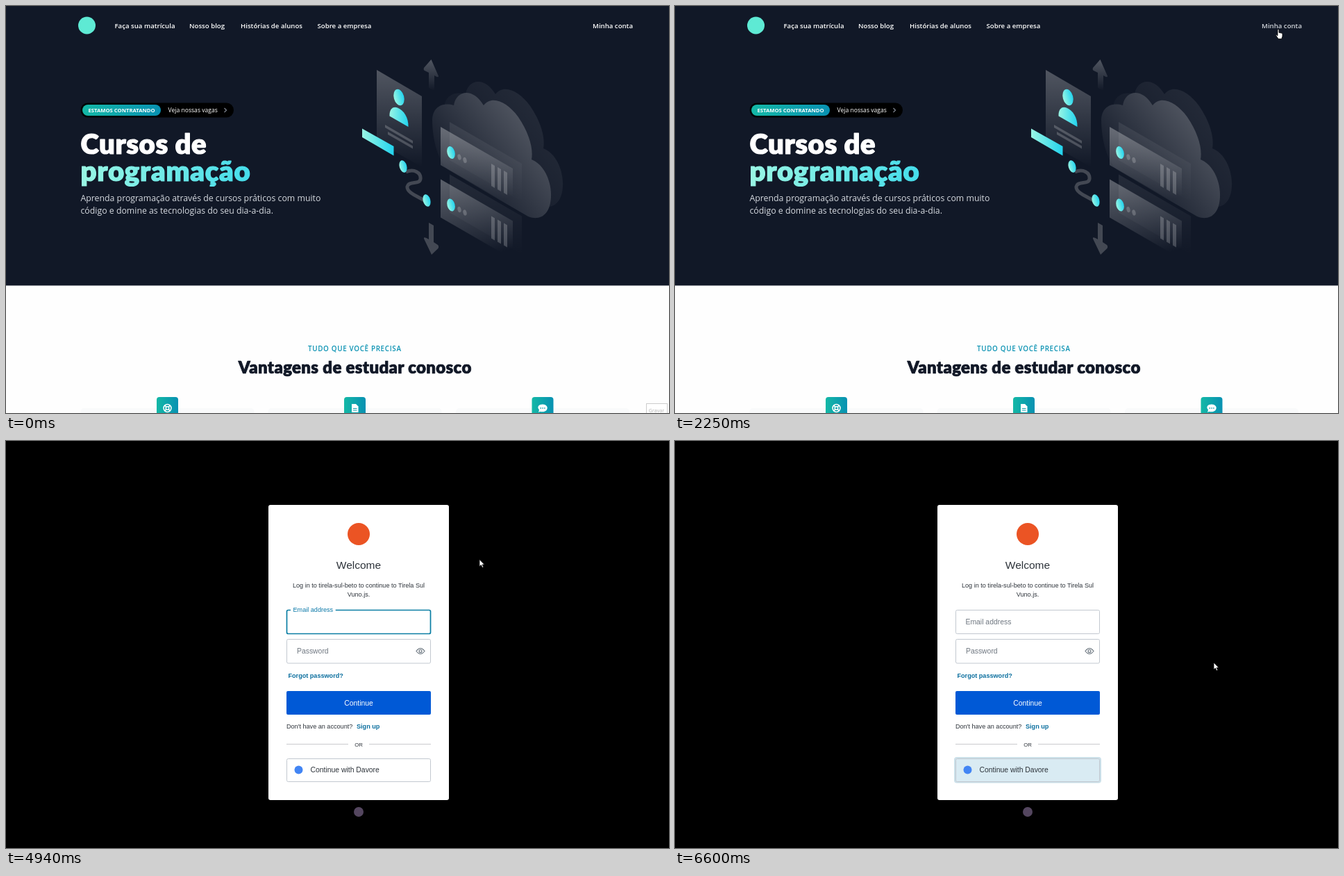
Animation of 955 by 586 pixels, one loop 8000 ms. Source, as an HTML page:

```html
<!DOCTYPE html>
<html lang="pt-BR">
<head>
<meta charset="utf-8">
<title>Cursos</title>
<style>
  html, body { margin: 0; width: 100%; height: 100%; overflow: hidden; background: #000; }
  svg { display: block; width: 100vw; height: 100vh; }
  #home { font-family: "Open Sans", "Noto Sans", sans-serif; }
  #login { font: 9.1px "Liberation Sans", Arial, sans-serif; fill: #2d333a; }
  .nav { font-size: 9.65px; font-weight: 600; fill: #fff; }
  .title { font-family: Lato, sans-serif; font-weight: 900; font-size: 40px; letter-spacing: .014em; stroke-width: .03em; stroke-linejoin: round; }
  .lead { font-size: 12.3px; fill: #d6dae0; }
  .field { font-size: 10.4px; }
  .link { font-weight: 700; fill: #0a6e9e; }
  .mid { text-anchor: middle; }
  .box { fill: none; stroke: #c2c8d0; }
</style>
</head>
<body>
<svg viewBox="0 0 955 586">
  <defs>
    <linearGradient id="teal"><stop stop-color="#14b8a6"/><stop offset="1" stop-color="#0891b2"/></linearGradient>
    <linearGradient id="aqua"><stop stop-color="#99f6e4"/><stop offset="1" stop-color="#22d3ee"/></linearGradient>
    <linearGradient id="word" gradientUnits="userSpaceOnUse" x1="108" x2="454" y1="0" y2="0"><stop stop-color="#99f6e4"/><stop offset="1" stop-color="#22d3ee"/></linearGradient>
    <linearGradient id="fade" x2="0" y2="1"><stop stop-color="#fff" stop-opacity=".27"/><stop offset="1" stop-color="#fff" stop-opacity="0"/></linearGradient>
    <linearGradient id="panel" x1=".25" y1="0" x2=".5" y2="1"><stop stop-color="#fff" stop-opacity=".3"/><stop offset="1" stop-color="#fff" stop-opacity="0"/></linearGradient>
    <linearGradient id="mist" x1=".2" y1=".8" x2=".85" y2=".25"><stop stop-color="#fff" stop-opacity="0"/><stop offset="1" stop-color="#fff" stop-opacity=".27"/></linearGradient>
    <path id="cloud" d="M614 165C614 146 628 138 645 143C648 122 672 116 688 143C700 128 722 138 738 160C753 182 760 205 757 221C775 228 786 252 785 275C784 300 770 310 752 303L640 238C622 228 614 190 614 165Z"/>
    <path id="arrowUp" d="M612.500 77L623 101Q623 104 617 100V122L609 118V96L603 93Q601 92 602 89Z"/>
    <g id="server">
      <path d="M639 167L743 227V282L639 222Z" fill="url(#fade)" opacity=".3"/>
      <path d="M626 174L730 234V289L626 229Z" fill="url(#panel)"/>
      <ellipse cx="641" cy="211" rx="5.500" ry="9.300" transform="rotate(-15 641 211)" fill="url(#aqua)"/>
      <g fill="#fff" fill-opacity=".2">
        <ellipse cx="653" cy="217.500" rx="2.500" ry="4.200" transform="rotate(-15 653 217.500)"/>
        <ellipse cx="661" cy="222" rx="2.500" ry="4.200" transform="rotate(-15 661 222)"/>
        <path d="M699 227l5 3v32l-5-3zM708 232l5 3v32l-5-3zM717 237l5 3v32l-5-3z"/>
      </g>
    </g>
    <g id="tile">
      <rect x="-125" y="16" width="250" height="30" rx="5" fill="#f9fafb"/>
      <rect x="-15.500" width="31" height="31" rx="4" fill="url(#teal)"/>
    </g>
  </defs>

  <g id="home">
    <rect width="955" height="586" fill="#fefefe"/>
    <rect width="955" height="402.500" fill="#111827"/>
    <circle cx="116.500" cy="28" r="12.500" fill="#5eead4"/>
    <g class="nav">
      <text x="156.500" y="32">Faça sua matrícula</text>
      <text x="264" y="32">Nosso blog</text>
      <text x="338" y="32">Histórias de alunos</text>
      <text x="448.500" y="32">Sobre a empresa</text>
      <text id="account" x="903" y="32" text-anchor="end">Minha conta</text>
    </g>

    <rect x="107.500" y="139.500" width="220.500" height="21" rx="10.500"/>
    <rect x="110" y="142" width="113" height="16" rx="8" fill="url(#teal)"/>
    <text class="mid" x="166.500" y="153.200" font-size="7.700" font-weight="700" fill="#fff">ESTAMOS CONTRATANDO</text>
    <text x="233.500" y="153.300" font-size="8.600" fill="#fff">Veja nossas vagas</text>
    <path d="M314.500 147l3 3-3 3" fill="none" stroke="#7b818c" stroke-width="1.300"/>

    <text class="title" x="107.500" y="212.500" fill="#fff" stroke="#fff">Cursos de</text>
    <text class="title" x="107.500" y="251.500" fill="url(#word)" stroke="url(#word)" style="letter-spacing:.02em">programação</text>
    <text class="lead" x="107.500" y="281">Aprenda programação através de cursos práticos com muito</text>
    <text class="lead" x="107.500" y="299">código e domine as tecnologias do seu dia-a-dia.</text>

    <use href="#cloud" x="17" y="-16" fill="url(#mist)" opacity=".3"/>
    <use href="#cloud" fill="#111827"/>
    <use href="#cloud" fill="url(#mist)"/>
    <path d="M534 92L599 130V232L534 195Z" fill="url(#fade)"/>
    <ellipse cx="566" cy="131.500" rx="7.300" ry="12" transform="rotate(-15 566 131.500)" fill="url(#aqua)"/>
    <path d="M552.500 158.500C552 149 557 144 564 146.500C573 150 580 161 579.500 174Z" fill="url(#aqua)"/>
    <path d="M546 171l40 23v4l-40-23zM550 181l36 20.500v4l-36-20.500z" fill="#fff" fill-opacity=".2"/>
    <path d="M513 176.500L558.500 202V215.500L513 189Z" fill="url(#aqua)"/>
    <use href="#arrowUp" fill="url(#fade)"/>
    <path d="M609 312L616 316V340L622 344Q624 346 622.500 349L613 358L602 335Q601 331 609 336Z" fill="#434853"/>
    <path d="M576 239C588 234 598 240 597 249C596 258 580 251 578 260C577 268 590 273 603 280" fill="none" stroke="#434853" stroke-width="5"/>
    <ellipse cx="572" cy="231" rx="5.300" ry="9" transform="rotate(-15 572 231)" fill="url(#aqua)"/>
    <ellipse cx="606" cy="280" rx="5.300" ry="9" transform="rotate(-15 606 280)" fill="url(#aqua)"/>
    <use href="#server"/>
    <use href="#server" y="75.500"/>

    <text x="435" y="497" font-size="9.900" font-weight="600" letter-spacing=".65" fill="#0891b2">TUDO QUE VOCÊ PRECISA</text>
    <text class="title mid" x="502.700" y="529" style="font-size:24px" fill="#111827" stroke="#111827">Vantagens de estudar conosco</text>
    <use href="#tile" x="232.500" y="563"/>
    <use href="#tile" x="502.500" y="563"/>
    <use href="#tile" x="773" y="563"/>
    <g fill="none" stroke="#fff" stroke-width="1.500">
      <circle cx="232.500" cy="579" r="5.500"/><circle cx="232.500" cy="579" r="2.300"/>
      <path d="M228.600 575.100l2.300 2.300m3.200 3.200l2.300 2.300m0-7.800l-2.300 2.300m-3.200 3.200l-2.300 2.300"/>
    </g>
    <path d="M498 573h6l3.500 3.500V585H498z" fill="#fff"/>
    <path d="M500 579.500h5.500M500 582h5.500" stroke="#119fac"/>
    <path d="M767 585l1-3.500C764 577 768 573.500 773 573.500C783 574 781 584.500 773 584.300Q770.500 584.300 769 584Z" fill="#fff"/>
    <path d="M769.500 579h1.500m1.300 0h1.500m1.300 0h1.500" stroke="#119fac" stroke-width="1.500"/>
    <g id="tooltip">
      <rect x="922.500" y="572.500" width="30" height="18" fill="#fff" stroke="#ccc"/>
      <text class="mid" x="937" y="584.500" font-size="7.200" fill="#b5b5b5">Gravar</text>
    </g>
  </g>

  <g id="login">
    <rect width="955" height="586" fill="#000"/>
    <rect x="378" y="92" width="260" height="425" rx="3" fill="#fff"/>
    <circle cx="508" cy="134" r="16" fill="#eb5424"/>
    <circle cx="508" cy="534" r="7" fill="#54465f"/>
    <text class="mid" x="508" y="184" font-size="15.500">Welcome</text>
    <text class="mid" x="508" y="210.500">Log in to tirela-sul-beto to continue to Tirela Sul</text>
    <text class="mid" x="508" y="224">Vuno.js.</text>

    <rect class="box" x="404.500" y="243.500" width="207" height="34" rx="2"/>
    <rect id="emailRing" class="box" x="404.500" y="243.500" width="207" height="34" rx="2" style="stroke:#0a7ea4"/>
    <rect id="emailGap" y="240" height="6" fill="#fff"/>
    <text id="emailLabel">Email address</text>
    <path id="caret" d="M415.500 255v11" stroke="#222"/>

    <rect class="box" x="404.500" y="285.500" width="207" height="34.500" rx="2"/>
    <rect id="passwordRing" class="box" x="404.500" y="285.500" width="207" height="34.500" rx="2" style="stroke:#222"/>
    <text id="passwordLabel" class="field" fill="#6f7780">Password</text>
    <g fill="none" stroke="#65707a" stroke-width="1.100">
      <path d="M591 302.500Q597 294.500 603 302.500Q597 310.500 591 302.500Z"/><circle cx="597" cy="302.500" r="2"/>
    </g>
    <text class="link" x="406.500" y="340.500">Forgot password?</text>

    <rect x="404" y="360" width="208" height="34" rx="2" fill="#0059d6"/>
    <text class="field mid" x="508" y="380.500" fill="#fff">Continue</text>
    <text x="404" y="414">Don't have an account?</text>
    <text class="link" x="505" y="414">Sign up</text>
    <path d="M404 436.500h89m30 0h89" stroke="#c9cace"/>
    <text class="mid" x="508" y="440" font-size="7.800">OR</text>

    <rect id="hover" x="404" y="457" width="208" height="34" rx="2" fill="#efefef"/>
    <g id="focus">
      <rect x="402" y="455" width="212" height="37.500" rx="4" fill="#cbe0e9"/>
      <rect x="404" y="457" width="208" height="34" rx="2" fill="#d9ebf3"/>
    </g>
    <rect class="box" x="404.500" y="457.500" width="207" height="33" rx="2"/>
    <circle cx="421.500" cy="473.500" r="6" fill="#4285f4"/>
    <text class="field" x="438.500" y="477">Continue with Davore</text>
  </g>

  <g id="cursor" fill="#fff" stroke="#000" stroke-width=".8" stroke-linejoin="round">
    <path id="arrow" d="M0 0V10.200l2.400-2.200 1.600 3.800 1.800-.7-1.600-3.700H7.400Z"/>
    <path id="hand" d="M-1 8V1.300a1 1 0 0 1 2 0V5l4 .8q1 .3 1 1.300v3.200L4.800 14H0L-3.500 8.900q.6-1.400 2.500.6Z"/>
  </g>
</svg>
<script>
const LOOP = 8000, LOGIN = 4180, BLUR = 5970;
const $ = id => document.getElementById(id);
const clamp = x => Math.min(1, Math.max(0, x));
const ease = x => x * x * (3 - 2 * x);
const mix = (a, b, u) => a + (b - a) * u;
const show = (id, on) => $(id).style.display = on ? "" : "none";
const set = (id, attrs) => Object.entries(attrs).forEach(([k, v]) => $(id).setAttribute(k, v));

// start, end, steps, control points of the path
const moves = [
  [70, 400, 6, [[953, 590], [760, 400], [647, 307]]],
  [1070, 1840, 12, [[648, 307], [595, 270], [690, 110], [833, 74]]],
  [1910, 2250, 6, [[833, 74], [869, 33.3]]],
  [2520, 2521, 1, [[869, 33.3], [869, 34]]],
  [2780, 3190, 7, [[869, 34], [830, 110], [773, 171]]],
  [4590, 5290, 11, [[773, 171], [740, 70], [650, 170], [614, 346]]],
  [5440, 5760, 6, [[614, 346], [580, 420], [529.5, 474.5]]],
  [6250, 6600, 6, [[529.5, 474.5], [640, 380], [776, 319]]],
];

function bezier(points, u) {
  while (points.length > 1)
    points = points.slice(1).map((p, i) => [mix(points[i][0], p[0], u), mix(points[i][1], p[1], u)]);
  return points[0];
}

function cursorAt(t) {
  const [start, end, steps, path] = moves.findLast(m => t >= m[0]) || moves[0];
  const step = Math.floor(clamp((t - start) / (end - start)) * (steps - 1) + 1e-6) + 1;
  return bezier(path, ease(step / steps));
}

function draw(t) {
  const login = t >= LOGIN;
  const [x, y] = cursorAt(t);
  const overLink = !login && x > 840 && y < 38;
  const inButtonX = login && x > 404 && x < 612;
  const overSocial = inButtonX && y > 457 && y < 491;
  const hand = overLink || overSocial || (inButtonX && y > 360 && y < 394);

  show("home", !login);
  show("login", login);
  show("tooltip", t < 70);
  show("cursor", t >= 70);
  show("arrow", !hand);
  show("hand", hand);
  set("cursor", { transform: `translate(${x} ${y})` });
  set("account", { fill: overLink ? "#d1d5db" : "#fff" });
  if (!login) return;

  const settle = ease(clamp((t - LOGIN) / 210));
  const blur = ease(clamp((t - BLUR) / 210));
  const labelX = mix(mix(415, 413.5, settle), 418.5, blur);
  const labelY = mix(mix(251, 246, settle), 264, blur);
  const labelSize = mix(mix(10.4, 9.1, settle), 10.4, blur);
  const pad = 3.5 * settle;
  set("emailLabel", { x: labelX, y: labelY, "font-size": labelSize });
  $("emailLabel").style.fill = `color-mix(in srgb, #6f7780 ${blur * 100}%, #0a78a8)`;
  set("emailGap", { x: labelX - pad, y: labelY - 8, width: labelSize * 6.34 + 2 * pad, height: 9 });
  set("emailRing", { "stroke-width": 1 + 0.7 * settle, opacity: (0.6 + 0.4 * settle) * (1 - blur) });
  set("passwordLabel", { x: mix(415, 419, settle), y: mix(311, 306, settle) });
  set("passwordRing", { opacity: 1 - settle });
  show("caret", t < BLUR && (t < 4770 || (t >= 5270 && t < 5770)));
  show("hover", overSocial);
  set("focus", { opacity: ease(clamp((t - BLUR) / 350)) });
}

function tick() {
  draw(performance.now() % LOOP);
  requestAnimationFrame(tick);
}
tick();
</script>
</body>
</html>
```
